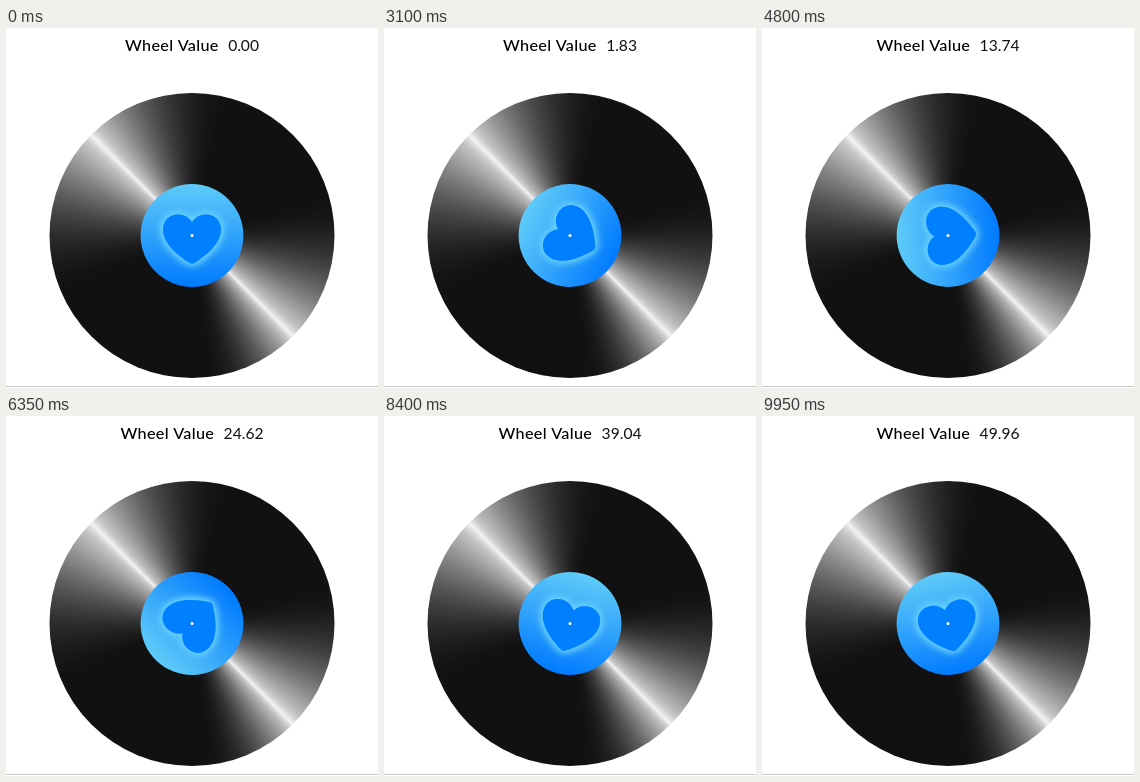
An HTML page with a canvas for the animation above (10000 ms loop, 372 px wide and 360 px high).

```html
<!DOCTYPE html>
<html lang="en">
<head>
<meta charset="utf-8">
<title>Wheel Value</title>
<style>
  html, body { margin: 0; width: 100%; height: 100%; overflow: hidden; background: #fff; }
  canvas { display: block; }
</style>
</head>
<body>
<canvas id="stage" width="372" height="360"></canvas>
<script>
const ctx = document.getElementById('stage').getContext('2d');
const LOOP = 10000, STEP = 50, TAU = Math.PI * 2;
const CX = 186, CY = 207.5, DISC_R = 142.5, LABEL_R = 51.4;
const SPIN_START = 2.839, SPIN_SPEED = 7, SPIN_GAIN = 0.0037;

// Highlight fading from 1 to 0 over `before` or `after` degrees around `center`
function glint(deg, center, before, after) {
  const d = deg - center;
  const left = Math.max(0, 1 - Math.abs(d) / (d < 0 ? before : after));
  return left * left;
}

function sheen(deg) {
  const broad = glint(deg, 45, 64, 40) + glint(deg, 405, 64, 40) + glint(deg, 225, 72, 62);
  const line = glint(deg, 45, 5, 4) + glint(deg, 225, 5, 4);
  return Math.round(17 + 200 * broad + 27 * line);
}

function vinylGradient() {
  const gradient = ctx.createConicGradient(0, CX, CY);
  for (let deg = 0; deg <= 360; deg++) {
    const g = sheen(deg);
    gradient.addColorStop(deg / 360, `rgb(${g},${g},${g})`);
  }
  return gradient;
}
const vinyl = vinylGradient();

const sky = ctx.createLinearGradient(0, -LABEL_R, 0, LABEL_R);
sky.addColorStop(0, '#5fcbf8');
sky.addColorStop(1, '#007aff');

const heart = new Path2D(
  'M0-13.5C-3-18-8-21-14-21C-23-21-29-14.5-29-6C-29 8-14 20-3 27Q0 29 3 27' +
  'C14 20 29 8 29-6C29-14.5 23-21 14-21C8-21 3-18 0-13.5Z');

// A small nudge and return, then a nearly constant fast spin
function turnsAt(t) {
  if (t > 1.6 && t < 2.25) return 0.0907 * Math.sin(Math.PI * (t - 1.6) / 0.65);
  const x = Math.max(0, t - SPIN_START);
  return SPIN_SPEED * x + SPIN_GAIN * x * x;
}

function disc(x, y, r, fill) {
  ctx.beginPath();
  ctx.arc(x, y, r, 0, TAU);
  ctx.fillStyle = fill;
  ctx.fill();
}

function drawTitle(value) {
  const titleFont = '500 16.2px Lato, sans-serif', valueFont = '400 15.6px Lato, sans-serif';
  const title = 'Wheel Value', number = value.toFixed(2), gap = 9.5, baseline = 23.3;
  ctx.letterSpacing = '0px';
  ctx.font = valueFont;
  const numberW = ctx.measureText(number).width;
  ctx.letterSpacing = '0.3px';
  ctx.font = titleFont;
  const titleW = ctx.measureText(title).width;
  const left = CX - (titleW + gap + numberW) / 2;
  ctx.fillStyle = '#000';
  ctx.fillText(title, left, baseline);
  ctx.letterSpacing = '0px';
  ctx.font = valueFont;
  ctx.fillStyle = '#111';
  ctx.fillText(number, left + titleW + gap, baseline);
}

function drawLabel(turns) {
  ctx.save();
  ctx.translate(CX, CY);
  ctx.rotate(turns % 1 * TAU);
  disc(0, 0, LABEL_R, sky);
  ctx.fillStyle = '#007fff';
  ctx.shadowColor = '#64d0fa';
  ctx.shadowBlur = 8;
  for (let i = 0; i < 3; i++) ctx.fill(heart);
  ctx.restore();
  disc(CX, CY, 1.5, '#fff');
}

function draw(ms) {
  const turns = turnsAt(Math.floor((ms % LOOP + 1) / STEP) * STEP % LOOP / 1000);
  ctx.fillStyle = '#fff';
  ctx.fillRect(0, 0, 372, 360);
  ctx.fillStyle = '#c8c8c8';
  ctx.fillRect(0, 358, 372, 1);
  drawTitle(turns);
  disc(CX, CY, DISC_R, vinyl);
  drawLabel(turns);
}

function frame(now) {
  draw(now);
  requestAnimationFrame(frame);
}
draw(0);
requestAnimationFrame(frame);
</script>
</body>
</html>
```
